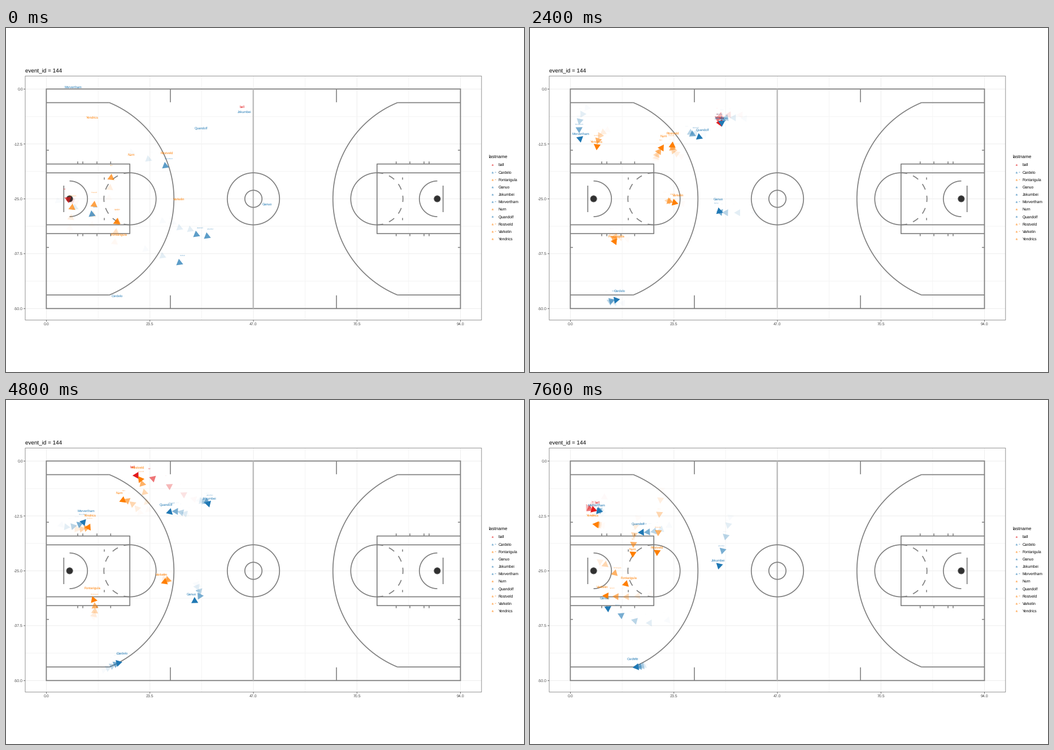
A matplotlib script that plays this animation: 917x611 px, repeating every 8000 ms.

```python
import math
import numpy as np
import matplotlib.pyplot as plt
from matplotlib.animation import FuncAnimation
from matplotlib.patches import Circle, Polygon, Rectangle

plt.rcParams.update({"font.family": "Liberation Sans", "text.hinting": "no_hinting",
                     "path.snap": False})
W, H, DPI = 917, 611, 72  # one point equals one pixel
FRAMES, INTERVAL = 20, 400
STRIDE = 4  # frames between waypoints
WAKE = 5  # poses visible at once
RED, BLUE, ORANGE = "#e31a1c", "#1f78b4", "#ff7f00"
LINE = "#7f7f7f"
CLOSING_STEP = {RED: (-7, -3), BLUE: (30, 12), ORANGE: (2, -18)}

fig = plt.figure(figsize=((W + 0.01) / DPI, (H + 0.01) / DPI), dpi=DPI, facecolor="white")
ax = fig.add_axes([0, 0, 1, 1])
ax.set(xlim=(0, W), ylim=(H, 0))
ax.axis("off")


def text(x, y, s, size, color="black", ha="left", **kw):
    """Place text with its capitals vertically centred on y."""
    return ax.text(x, y + 0.36 * size, s, fontsize=size, color=color, ha=ha,
                   va="baseline", **kw)


def line(x0, y0, x1, y1, color=LINE, lw=1.7, z=2):
    ax.plot([x0, x1], [y0, y1], color=color, lw=lw, zorder=z, solid_capstyle="butt")


def triangle(x, y, angle, r, color, alpha, z):
    a = angle + np.arange(3) * 2 * np.pi / 3
    pts = np.column_stack([x + r * np.cos(a), y + r * np.sin(a)])
    return ax.add_patch(Polygon(pts, fc=color, ec="none", alpha=alpha, zorder=z))


class Track:
    """A mover on a smooth path through evenly timed waypoints."""

    def __init__(self, name, color, end, *waypoints):
        self.name, self.color = name, color
        self.end, self.step = np.array(end), np.array(CLOSING_STEP[color])
        self.points = np.array(waypoints, float)
        self.slopes = np.gradient(self.points, axis=0)

    def position(self, i):
        if i < 0:  # the wake of the preceding play, which rests for two poses
            return self.end - self.step * max(0, -i - 2)
        k = min(i // STRIDE, len(self.points) - 2)
        u = i / STRIDE - k
        p, q = self.points[k:k + 2]
        m, n = self.slopes[k:k + 2]
        return ((2 * u**3 - 3 * u**2 + 1) * p + (u**3 - 2 * u**2 + u) * m
                + (3 * u**2 - 2 * u**3) * q + (u**3 - u**2) * n)

    def heading(self, i):
        dx, dy = self.step if i < 0 else self.position(i + 1) - self.position(i - 1)
        return math.atan2(dy, dx)


tracks = [
    Track("ball", RED, (110, 304),
          (418, 155), (337, 156), (333, 176), (231, 134), (110, 185), (117, 197)),
    Track("Cardelo", BLUE, (307, 417),
          (197, 491), (142, 486), (173, 479), (199, 467), (201, 472), (184, 475)),
    Track("Fontarigula", ORANGE, (117, 319),
          (200, 382), (151, 371), (155, 385), (155, 355), (124, 287), (188, 344)),
    Track("Ganuo", BLUE, (152, 331),
          (462, 328), (347, 328), (337, 327), (334, 357), (212, 396), (114, 359)),
    Track("Jokumbei", BLUE, (356, 370),
          (422, 164), (347, 160), (343, 178), (358, 184), (351, 222), (329, 320)),
    Track("Morvertham", BLUE, (282, 245),
          (119, 120), (88, 165), (98, 222), (137, 217), (125, 197), (121, 198)),
    Track("Nurn", ORANGE, (186, 266),
          (222, 240), (225, 225), (237, 200), (207, 178), (187, 224), (181, 290)),
    Track("Quandolf", BLUE, (337, 367),
          (345, 193), (284, 186), (319, 202), (290, 199), (232, 230), (187, 236)),
    Track("Rostveld", ORANGE, (156, 314),
          (285, 237), (254, 218), (252, 195), (238, 141), (231, 177), (223, 304)),
    Track("Varkelin", ORANGE, (196, 345),
          (306, 319), (245, 307), (275, 316), (281, 323), (191, 348), (117, 347)),
    Track("Yendrics", ORANGE, (197, 344),
          (153, 174), (124, 191), (120, 227), (146, 226), (123, 222), (116, 221)),
]


def draw_axes():
    left, top, right, bottom = 34, 85.3, 841.8, 518.8
    xs, ys = np.linspace(71.5, 804.5, 5), np.linspace(108.5, 498.3, 5)
    for shade, pick in (("#ebebeb", lambda v: v), ("#f4f4f4", lambda v: (v[1:] + v[:-1]) / 2)):
        for x in pick(xs):
            line(x, top, x, bottom, shade, 0.9, 1)
        for y in pick(ys):
            line(left, y, right, y, shade, 0.9, 1)
    for k, (x, y) in enumerate(zip(xs, ys)):
        line(x, bottom, x, bottom + 2.7, "#333333", 0.8)
        line(left - 2.7, y, left, y, "#333333", 0.8)
        text(x, 525.3, f"{23.5 * k:.1f}", 7, "#4d4d4d", "center")
        text(30, y, f"{-12.5 * k if k else 0:.1f}", 7, "#4d4d4d", "right")
    ax.add_patch(Rectangle((left, top), right - left, bottom - top, fill=False,
                           ec="#858585", lw=0.9, zorder=9))
    text(34, 75.5, "event_id = 144", 9.9)


def draw_court():
    cx, cy, x0, x1, y0, y1 = 438, 303.4, 71.4, 804.5, 108.4, 498.3
    ax.add_patch(Rectangle((x0, y0), x1 - x0, y1 - y0, fill=False, ec=LINE, lw=1.8, zorder=2))
    line(cx - 0.3, y0, cx - 0.3, y1, "#bebebe", 2.5)
    for r in (46.2, 15.2):
        ax.add_patch(Circle((cx, cy), r, fill=False, ec=LINE, lw=1.7, zorder=2))
    for side in (1, -1):
        def mx(x):
            return cx + side * (x - cx)

        def seg(xa, ya, xb, yb, lw=1.7):
            line(mx(xa), ya, mx(xb), yb, lw=lw)

        def arc(x, r, start, stop):
            a = np.radians(np.linspace(start, stop, 60))
            ax.plot(mx(x + r * np.cos(a)), cy + r * np.sin(a), color=LINE, lw=1.7,
                    zorder=2, solid_capstyle="butt")

        arc(112.5, 184.8, -67.8, 67.8)
        arc(112.5, 31.7, -90, 90)
        arc(219.5, 46.2, -90, 90)
        for k in range(7):
            start = 90 + 360 / 13 * k
            arc(219.5, 46.2, start, start + 180 / 13)
        for s in (-1, 1):
            seg(x0, cy + s * 170.8, 182.3, cy + s * 170.8)
            seg(x0, cy + s * 61.8, 219.8, cy + s * 61.8)
            seg(x0, cy + s * 46.1, 219.2, cy + s * 46.1)
            seg(x0, cy + s * 86.3, 76, cy + s * 86.3, 1.5)
            seg(291, cy + s * 171.5, 291, cy + s * 195, 1.6)
            seg(174, cy + s * 34, 174, cy + s * 38, 1.6)
            for x in (127, 136, 161, 185.3):
                seg(x, cy + s * 62, x, cy + s * 66.3, 1.6)
        seg(219.2, cy - 61.8, 219.2, cy + 61.8)
        seg(102.3, 280, 102.3, 327)
        ax.add_patch(Circle((mx(112.6), cy), 5.6, fc="#303030", ec="#5a5a5a", lw=0.9, zorder=3))


def draw_legend():
    text(854, 228, "lastname", 8.2)
    for k, t in enumerate(tracks):
        y = 243 + 13.13 * k
        text(861.3, y + 0.4, "a", 5.6, t.color, "center", alpha=0.6)
        triangle(861.3, y + 0.6, -math.pi / 2, 1.9, t.color, 0.45, 3)
        if k in (1, 2, 5, 8, 9):
            line(865.6, y, 867.4, y, t.color, 0.7)
        text(871.8, y, t.name, 6.7)


draw_axes()
draw_court()
draw_legend()
live = []


def draw_pose(track, i, age):
    alpha, z = (1 - age / WAKE) ** 2.3, 5 + (age == 0)
    x, y = track.position(i)
    if i:  # at the start there is no heading yet, only a label
        a = track.heading(i)
        live.append(triangle(x, y, a, 7.1, track.color, alpha, z))
        x, y = x + 6.7 * math.cos(a), y + 6.7 * math.sin(a)
    live.append(text(x, y - 15.3, track.name, max(1, 5.8 * 0.5**age), track.color,
                     "center", alpha=alpha, zorder=z + 0.5))


def update(frame):
    while live:
        live.pop().remove()
    for age in reversed(range(WAKE)):
        for track in tracks:
            draw_pose(track, frame - age, age)
    return live


anim = FuncAnimation(fig, update, frames=FRAMES, interval=INTERVAL, repeat=True,
                     repeat_delay=0, blit=False)
plt.show()
```
